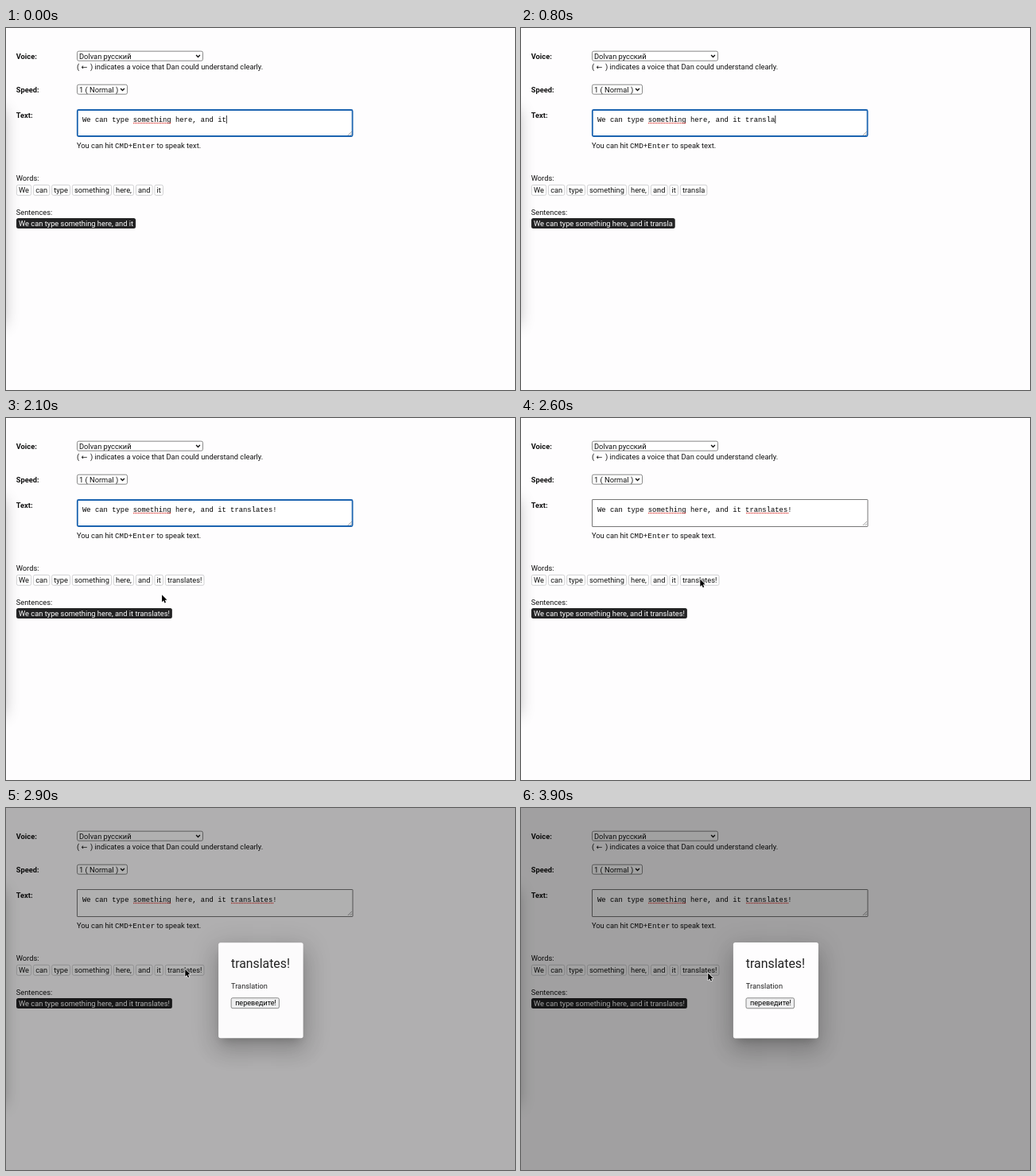
Write an HTML page with a canvas that moves like this. It is 640 px wide and 455 px high and loops after 4 s.

```html
<!DOCTYPE html>
<html lang="en">
<head>
<meta charset="utf-8">
<title>Type and translate</title>
<style>
html, body { margin: 0; width: 100%; height: 100%; overflow: hidden; background: #fefdfe; }
canvas { display: block; }
</style>
</head>
<body>
<canvas id="stage" width="640" height="455"></canvas>
<script>
const ctx = document.getElementById('stage').getContext('2d');
const LOOP = 4000;
const SANS = 'Roboto, sans-serif';
const MONO = '"Liberation Mono", monospace';
const BODY = `9.3px ${SANS}`;
const BOLD = `bold 9.3px ${SANS}`;
const CHAR = 5.32;
const TEXT = 'We can type something here, and it translates!';
const START = 34;
const KEYS = [100, 100, 200, 300, 400, 500, 600, 800, 900, 1000, 1100, 1400];
const BLUR_AT = 2600;
const OPEN_AT = 2800;
const SHADE = [0.1, 0.31, 0.35, 0.363, 0.368, 0.37];
const GROW = [0.53, 0.985, 1];

// Pointer path: time, x, y
const PATH = [
  [1900, 179.5, 231], [2400, 221, 209], [2500, 225.3, 202.8],
  [3500, 225.3, 202.8], [3900, 235.2, 207.4]
];

const stepOf = (list, i) => list[Math.min(i, list.length - 1)];

function text(str, x, y, font = BODY, color = '#111') {
  ctx.font = font;
  ctx.fillStyle = color;
  ctx.fillText(str, x, y);
}

function box(x, y, w, h, r, fill, stroke, line = 0.8) {
  ctx.beginPath();
  ctx.roundRect(x, y, w, h, r);
  if (fill) {
    ctx.fillStyle = fill;
    ctx.fill();
  }
  if (stroke) {
    ctx.strokeStyle = stroke;
    ctx.lineWidth = line;
    ctx.stroke();
  }
}

function polyline(points, color, width) {
  ctx.beginPath();
  points.forEach(([x, y]) => ctx.lineTo(x, y));
  ctx.strokeStyle = color;
  ctx.lineWidth = width;
  ctx.stroke();
}

// Casts only the shadow of a box, which itself stays off stage
function shadow(x, y, w, h, blur, alpha) {
  const far = 3000;
  ctx.save();
  ctx.setTransform(1, 0, 0, 1, 0, 0);
  ctx.shadowColor = `rgba(0,0,0,${alpha})`;
  ctx.shadowBlur = blur;
  ctx.shadowOffsetX = far;
  ctx.fillStyle = '#000';
  ctx.fillRect(x - far, y, w, h);
  ctx.restore();
}

function select(label, y, w) {
  box(89.5, y, w, 12, 2, '#fff', '#6c6c6c');
  text(label, 92, y + 9.3);
  const x = 89.5 + w - 6;
  polyline([[x - 2.4, y + 4.8], [x, y + 7.2], [x + 2.4, y + 4.8]], '#111', 1.4);
}

function squiggle(from, to) {
  ctx.fillStyle = '#e0403c';
  for (let x = from; x < to; x += 2) ctx.fillRect(x, 118.9, 1.2, 1.3);
}

function drawInput(t, typed) {
  const focused = t < BLUR_AT;
  if (focused) box(89.8, 103, 345.8, 33, 1.5, '#fff', '#1c64b0', 1.8);
  else box(89.5, 102.5, 346.5, 34, 0.5, '#fff', '#777', 1);
  polyline([[429.8, 135], [434.8, 130]], '#777', 0.7);
  polyline([[432.6, 135], [434.8, 132.8]], '#777', 0.7);

  text(typed, 96, 118, `8.866px ${MONO}`, '#000');
  squiggle(160, 208);
  if (!focused) squiggle(283, 336);

  const lastKey = Math.max(0, ...KEYS.filter(k => k <= t));
  if (focused && Math.floor((t - lastKey) / 500) % 2 === 0) {
    ctx.fillStyle = '#000';
    ctx.fillRect(96 + typed.length * CHAR, 110, 0.8, 10);
  }
}

function drawWords(typed) {
  let x = 16;
  for (const word of typed.split(' ').filter(Boolean)) {
    ctx.font = BODY;
    const w = ctx.measureText(word).width;
    box(x - 2.6, 197.3, w + 5.2, 13, 2, '#fff', '#c6c6c8');
    text(word, x, 207);
    x += w + 8.1;
  }
}

function drawSentence(typed) {
  ctx.font = BODY;
  box(13, 239, ctx.measureText(typed).width + 6, 13, 2.5, '#232324');
  text(typed, 16, 248.8, BODY, '#fff');
}

function drawPage(t) {
  const typed = TEXT.slice(0, START + KEYS.filter(k => k <= t).length);
  ctx.fillStyle = '#fefdfe';
  ctx.fillRect(0, 0, 640, 455);
  shadow(-60, 103, 57, 270, 20, 0.3);

  text('Voice:', 12.7, 38.5, BOLD);
  select('Dolvan русский', 29.2, 158);
  text('(', 89, 52);
  text('←', 94.8, 52, '9.3px "DejaVu Sans", sans-serif');
  text(') indicates a voice that Dan could understand clearly.', 106, 52);

  text('Speed:', 12.7, 80.5, BOLD);
  select('1 ( Normal )', 71.2, 63);

  text('Text:', 12.7, 112.5, BOLD);
  drawInput(t, typed);
  text('You can hit', 89, 150.5);
  text('CMD+Enter', 137, 150.5, `9.3px ${MONO}`);
  text('to speak text.', 189.5, 150.5);

  text('Words:', 12.7, 192);
  drawWords(typed);
  text('Sentences:', 12.7, 234.8);
  drawSentence(typed);
}

function drawDialog(t) {
  const n = Math.floor((t - OPEN_AT) / 100);
  ctx.fillStyle = `rgba(0,0,0,${stepOf(SHADE, n)})`;
  ctx.fillRect(0, 0, 640, 455);

  const p = stepOf(GROW, n);
  const k = 0.7 + 0.3 * p;
  const w = 107 * k, h = 120.4 * k;
  const x = 320.4 - w / 2, y = 229.2 - h / 2;
  ctx.save();
  ctx.globalAlpha = p;
  shadow(x + 5, y + 12, w - 10, h - 10, 10, 0.2);
  shadow(x - 2, y + 14, w + 4, h + 4, 25, 0.14);
  shadow(x - 5, y + 1, w + 10, h + 10, 31, 0.12);
  ctx.translate(320.4, 229.2);
  ctx.scale(k, k);
  ctx.translate(-320.4, -229.2);
  box(266.9, 169, 107, 120.4, 2.6, '#fefdfe');
  text('translates!', 282.8, 201, `15.9px ${SANS}`, '#212121');
  text('Translation', 282.8, 227, BODY, '#212121');
  if (n > 0) {
    box(283, 238.8, 60.5, 13, 1.8, '#efeff0', '#6c6c6c');
    text('переведите!', 288, 248.3, `9.1px ${SANS}`, '#000');
  }
  ctx.restore();
}

function drawPointer(t) {
  if (t < PATH[0][0]) return;
  let i = 0;
  while (i < PATH.length - 2 && t >= PATH[i + 1][0]) i++;
  const [t0, x0, y0] = PATH[i];
  const [t1, x1, y1] = PATH[i + 1];
  const p = Math.min(1, (t - t0) / (t1 - t0));
  ctx.save();
  ctx.translate(x0 + (x1 - x0) * p, y0 + (y1 - y0) * p);
  const arrow = new Path2D('M0 0V9L2.1 7.1L3.4 10.2L4.9 9.6L3.6 6.5H6.4Z');
  ctx.lineJoin = 'round';
  ctx.strokeStyle = '#fff';
  ctx.lineWidth = 1.2;
  ctx.stroke(arrow);
  ctx.fillStyle = '#000';
  ctx.fill(arrow);
  ctx.restore();
}

function frame(now) {
  const t = Math.floor((now % LOOP) / 100) * 100;
  drawPage(t);
  if (t >= OPEN_AT) drawDialog(t);
  drawPointer(t);
  requestAnimationFrame(frame);
}

requestAnimationFrame(frame);
</script>
</body>
</html>
```
